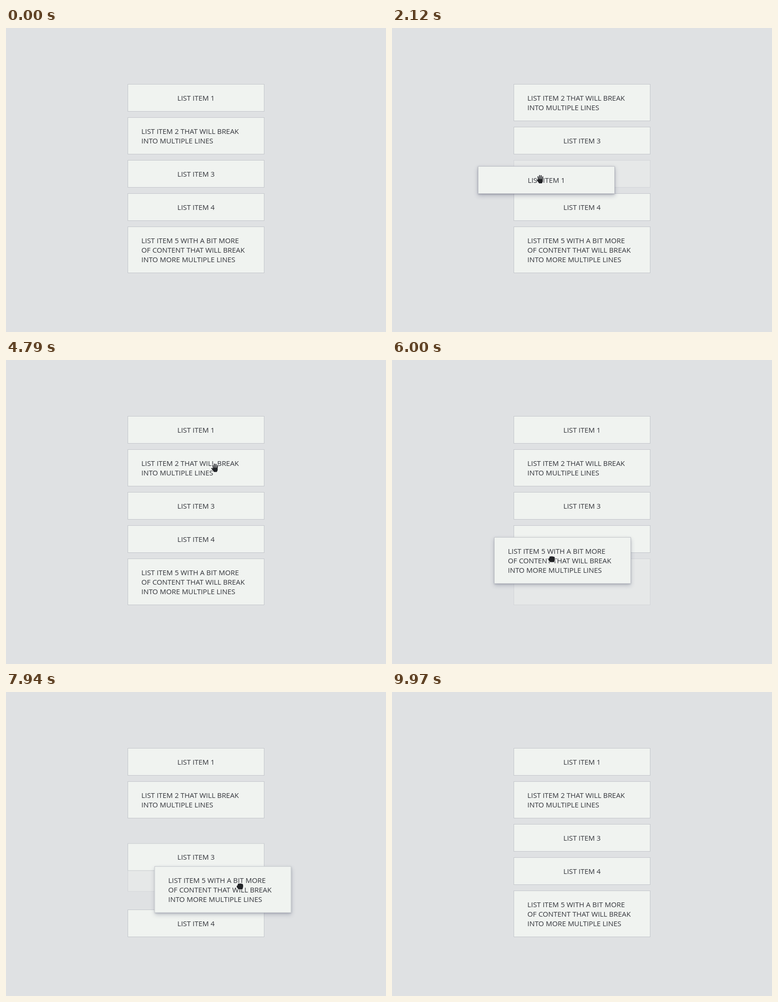
Animation, 800 px wide and 640 px high, one loop 10 s. Source, as an HTML page:

```html
<!DOCTYPE html>
<html lang="en">
<head>
<meta charset="utf-8">
<title>Sortable list</title>
<style>
  html, body { margin: 0; width: 100%; height: 100%; overflow: hidden; background: #dfe1e3; }
  #stage { position: relative; width: 800px; height: 640px; overflow: hidden; background: #dfe1e3; }
  .item, #slot {
    position: absolute; left: 0; top: 0; width: 288px; box-sizing: border-box;
    background: #f0f3f0; border: 1px solid #c3c6cb;
  }
  .item {
    z-index: 1; padding: 18px 28px; white-space: pre;
    font: 14.9px/20px "Open Sans", sans-serif; color: #33353b;
  }
  .single { text-align: center; }
  .lifted { z-index: 2; box-shadow: 0 1px 3px rgba(60, 65, 90, .35), 0 4px 9px rgba(70, 75, 105, .3); }
  #slot { opacity: .42; }
  #cursor { position: absolute; left: -12px; top: -12px; z-index: 3; overflow: visible; }
  #cursor path { stroke-linecap: round; stroke-linejoin: round; }
</style>
</head>
<body>
<div id="stage">
  <div id="slot"></div>
  <svg id="cursor" width="24" height="24" viewBox="-12 -12 24 24">
    <g id="open"></g>
    <g id="fist"></g>
  </svg>
</div>
<script>
const LOOP = 10000, LEFT = 256, TOP = 118, GAP = 12;
const SWAP = 180, DROP_DELAY = 50, DROP = 150;

const texts = [
  'LIST ITEM 1',
  'LIST ITEM 2 THAT WILL BREAK\nINTO MULTIPLE LINES',
  'LIST ITEM 3',
  'LIST ITEM 4',
  'LIST ITEM 5 WITH A BIT MORE\nOF CONTENT THAT WILL BREAK\nINTO MORE MULTIPLE LINES'
];

// Pointer moves: each bends past `via`; those with an item carry it until `drop`
const entry = [534, -14];
const moves = [
  { from: 0, to: 580, via: [460, 110], end: [387, 145] },
  { from: 790, to: 1920, via: [312, 265], end: [312, 318], item: 0, drop: 2120 },
  { from: 2150, to: 2600, via: [348, 322], end: [384, 316] },
  { from: 2750, to: 4300, via: [575, 281], end: [454, 151], item: 0, drop: 4450 },
  { from: 4500, to: 5390, via: [430, 300], end: [377, 464] },
  { from: 5580, to: 6580, via: [306, 415], end: [326, 314], item: 4, drop: 6850 },
  { from: 6850, to: 7300, via: [339, 338], end: [436, 320] },
  { from: 7610, to: 8550, via: [566, 502], end: [480, 501], item: 4, drop: 8640 },
  { from: 9300, to: 9590, via: [480, 580], end: [483, 690] }
];
moves.forEach((m, k) => { m.start = k ? moves[k - 1].end : entry; });

const $ = id => document.getElementById(id);
const stage = $('stage'), slot = $('slot'), cursor = $('cursor');
const clamp = v => Math.min(1, Math.max(0, v));
const easeOut = p => 1 - (1 - p) ** 3;
const easeInOut = p => p * p * (3 - 2 * p);
const mix = (a, b, p) => a + (b - a) * p;
const place = (el, x, y) => { el.style.transform = `translate(${x}px, ${y}px)`; };

const heights = texts.map(s => 38 + 20 * s.split('\n').length);
const items = texts.map(text => {
  const el = document.createElement('div');
  el.className = text.includes('\n') ? 'item' : 'item single';
  el.textContent = text;
  return stage.appendChild(el);
});

function drawHand(id, shape) {
  const layer = (color, width) => `<path d="${shape}" fill="${color}" stroke="${color}" stroke-width="${width}"/>`;
  $(id).innerHTML = layer('#f4f5f5', 4) + layer('#222427', 2);
}
drawHand('open', 'M-4 1L4.5 1L4.5 5L3 8L-2 8L-4 5ZM-4.6 -5L-3.4 2M-1.4 -7.6L-1 2M2 -7.2L1.8 2M5.4 -4.8L4.4 2M-7 1.4L-3.6 5.6');
drawHand('fist', 'M-3.6 -4L-1.8 -4.6L-.6 -4L.8 -4.8L2.2 -4L4 -4.2L5.6 -3L5.8 1L4.6 5.6L-2.6 5.6L-5.8 1.6L-5.6 -.6L-3.8 -.6Z');

function pointerAt(t) {
  const { from, to, start, via, end } = moves.findLast(m => m.from <= t);
  const p = easeInOut(clamp((t - from) / (to - from)));
  return [0, 1].map(k => mix(mix(start[k], via[k], p), mix(via[k], end[k], p), p));
}

function layout(order) {
  const tops = [];
  let y = TOP;
  for (const i of order) {
    tops[i] = y;
    y += heights[i] + GAP;
  }
  return tops;
}

// Trade places with a neighbour once the pointer would land inside the new slot
function reorder(order, item, y) {
  const tops = layout(order), at = order.indexOf(item);
  const prev = order[at - 1], next = order[at + 1];
  let other = -1;
  if (y < tops[prev] + Math.min(heights[prev], heights[item])) other = at - 1;
  if (y > Math.max(tops[next], tops[item] + heights[next] + GAP)) other = at + 1;
  if (other < 0) return order;
  const result = [...order];
  [result[at], result[other]] = [result[other], item];
  return result;
}

const drags = moves.filter(m => 'item' in m);
let order = items.map((_, i) => i);
const layouts = [{ time: 0, tops: layout(order) }];
for (const drag of drags) {
  const [x, y] = drag.start;
  drag.grab = [x - LEFT, y - layout(order)[drag.item]];
  for (let time = drag.from; time < drag.drop; time += 10) {
    const next = reorder(order, drag.item, pointerAt(time)[1]);
    if (next !== order) layouts.push({ time, tops: layout(next) });
    order = next;
  }
}

function topsAt(t) {
  return layouts[0].tops.map((top, i) => layouts.slice(1).reduce((y, { time, tops }, k) =>
    y + (tops[i] - layouts[k].tops[i]) * easeOut(clamp((t - time) / SWAP)), top));
}

function render(t) {
  const tops = topsAt(t);
  const drag = drags.find(d => t >= d.from && t < d.drop + DROP_DELAY + DROP);
  const holding = !!drag && t < drag.drop;

  items.forEach((el, i) => {
    el.classList.toggle('lifted', !!drag && drag.item === i);
    place(el, LEFT, tops[i]);
  });
  slot.style.display = drag ? '' : 'none';
  if (drag) {
    const { item, drop, grab } = drag;
    const [x, y] = pointerAt(Math.min(t, drop - 1));
    const p = easeOut(clamp((t - drop - DROP_DELAY) / DROP));
    slot.style.height = heights[item] + 'px';
    place(slot, LEFT, tops[item]);
    place(items[item], mix(x - grab[0], LEFT, p), mix(y - grab[1], tops[item], p));
  }
  place(cursor, ...pointerAt(t));
  $('open').style.display = holding ? 'none' : '';
  $('fist').style.display = holding ? '' : 'none';
}

const start = performance.now();
function tick() {
  render((performance.now() - start) % LOOP);
  requestAnimationFrame(tick);
}
tick();
</script>
</body>
</html>
```
